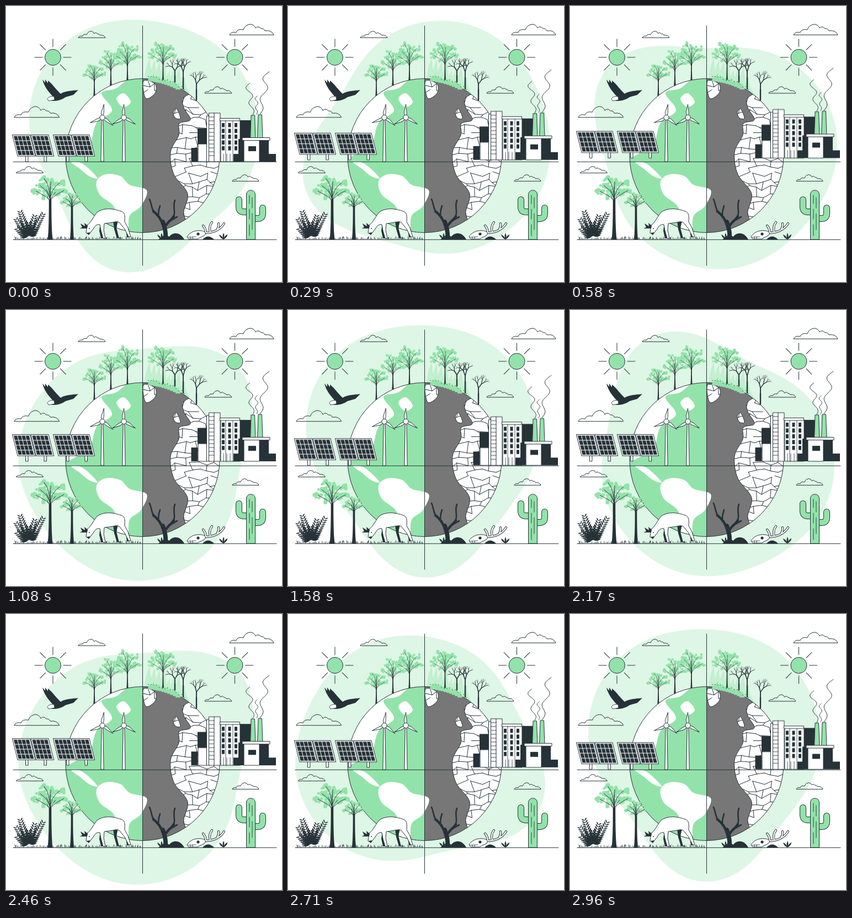
An HTML page that plays this animation: 500 px wide and 500 px high, repeating every 3 s.

```html
<!DOCTYPE html>
<html lang="en">
<head>
<meta charset="utf-8">
<title>Two halves of a planet</title>
<style>
  html, body { margin: 0; width: 100%; height: 100%; overflow: hidden; background: #fff; }
  svg { display: block; width: 100vw; height: 100vh; }
  .line { fill: none; stroke: #263238; stroke-linecap: round; stroke-linejoin: round; }
  .box { fill: #fff; stroke: #263238; stroke-linejoin: round; }
  .white { fill: #fff; }
  .gray { fill: #777; }
  .dark { fill: #263238; }
  .green { fill: #92e3a9; }
  .pale { fill: #c1efcf; }
  .lit { fill: #92e3a9; stroke: #263238; stroke-linejoin: round; }
  #blob { fill: #def6e5; transform-origin: 248px 255px; animation: spin 3s linear infinite; }
  .float { animation: float 3s linear infinite; }
  /* Two turns and two bobs per loop; the pace picks up at 36% */
  @keyframes spin {
    36% { transform: rotate(217.8deg); }
    100% { transform: rotate(720deg); }
  }
  @keyframes float {
    0%, 54.12%, 100% { transform: translateY(0); }
    29.75%, 77.06% { transform: translateY(-10px); }
    36% { transform: translateY(-7.9px); }
  }
</style>
</head>
<body>
<svg viewBox="0 0 500 500">
  <defs>
    <clipPath id="globe"><circle cx="247.5" cy="271" r="139.5"/></clipPath>
    <clipPath id="north"><rect x="107" y="131" width="140.5" height="151"/></clipPath>
    <clipPath id="soil"></clipPath>
    <path id="cloud" class="line" vector-effect="non-scaling-stroke"
      d="M0 20Q3 14 12 16Q14 9 25 11Q28 2 38 1Q45 2 47 8Q52 3 57 9Q62 8 64 13Q76 11 80 20Z"/>
  </defs>

  <path id="blob"/>
  <g id="sky"></g>
  <g id="hill"></g>
  <g id="earth" clip-path="url(#globe)"></g>
  <circle cx="247.5" cy="271" r="139.5" class="line"/>
  <g id="sparks"></g>
  <path class="line" d="M247.5 36V470M13 282.3H490M13 423.3H490"/>
  <g id="turbines"></g>
  <g id="panels" class="float"></g>
  <g id="factory" class="float"></g>
  <g id="garden"></g>

  <g id="bird">
    <path class="dark" d="M84 163C77 155 69 146 66 133L71 139 71 133 76 140 76 135C85 142 90 151 99 159C108 153 120 154 131 152L122 161 108 165C98 172 88 173 80 171Z"/>
    <path class="box" stroke-width=".8" d="M87 164C81 163 77 165 75 168L77 172 88 170Z"/>
  </g>

  <g id="deer">
    <path class="dark" d="M194 389H203L200 402 205 421H201L196 404ZM207 388L223 405 222 419H219L217 405ZM171 393H177L174 407 176 421H172L169 407Z"/>
    <path class="box" d="M147 397C155 392 158 381 166 373C179 364 198 368 209 372C217 375 215 383 215 391L221 402 226 418H222L215 404 206 393C202 388 194 393 178 394L177 406 180 421H176L172 407 170 396C165 395 161 398 158 404L150 414 145 411Z"/>
    <path class="dark" d="M148 398L142 393 143 399 135 394 138 401 133 403 147 403ZM146 411L150 415 153 410Z"/>
    <circle class="dark" cx="151" cy="403" r="1"/>
  </g>

  <g id="desert">
    <path class="dark" d="M292 423C300 408 315 408 323 423ZM356 423Q366 412 377 423ZM276 423L289 413 302 423Z"/>
    <path class="line" stroke-width="8" d="M289 419C290 410 288 402 284 391"/>
    <path class="line" stroke-width="4.5" d="M285 398C281 386 274 377 267 372M287 402C295 387 300 389 304 381"/>
    <path class="line" stroke-width="2.6" d="M268 373C263 366 264 358 260 350M276 379Q276 370 279 362M302 383C309 374 301 365 306 352M296 390L310 382"/>
    <g id="antlers"></g>
    <path class="box" d="M328 418C332 411 341 406 352 407C359 407 364 411 360 415C356 419 351 418 348 422H331Z"/>
    <circle class="dark" cx="348" cy="413" r="2.6"/>
    <path class="line" stroke-width=".8" d="M330 419L344 418M334 418V422M338 418V422"/>
    <g id="sprouts"></g>
    <g id="cactus"></g>
  </g>
</svg>

<script>
const $ = id => document.getElementById(id);
const add = (id, html) => $(id).insertAdjacentHTML('beforeend', html);

let seed = 7;
const rnd = (a = 0, b = 1) => {
  seed = (seed * 16807) % 2147483647;
  return a + (b - a) * seed / 2147483647;
};
const range = n => [...Array(n).keys()];
const rect = (x, y, w, h, cls) => `<rect x="${x}" y="${y}" width="${w}" height="${h}" class="${cls}"/>`;
const line = (d, w = 1) => `<path class="line" stroke-width="${w}" d="${d}"/>`;
const shape = (d, cls) => `<path class="${cls}" d="${d}"/>`;
const disc = (x, y, r) => `M${x - r} ${y}a${r} ${r} 0 1 0 ${2 * r} 0a${r} ${r} 0 1 0 ${-2 * r} 0`;

// A tube: dark rim with a lighter core
const tube = (d, w, core) => line(d, w) +
  `<path d="${d}" fill="none" stroke="${core}" stroke-width="${w - 2}" stroke-linecap="round"/>`;

// Closed curve through a few "x,y" points
function smooth(text) {
  const p = text.split(' ').map(q => q.split(',').map(Number));
  const n = p.length, at = i => p[(i + n) % n];
  const lean = (a, b, c) => [a[0] + (c[0] - b[0]) / 6, a[1] + (c[1] - b[1]) / 6];
  return 'M' + p[0] + p.map((b, i) =>
    `C${lean(b, at(i - 1), at(i + 1))} ${lean(at(i + 1), at(i + 2), b)} ${at(i + 1)}`).join('') + 'Z';
}

// Backdrop: a rounded, uneven triangle built from a few waves
$('blob').setAttribute('d', 'M' + range(180).map(i => {
  const t = i * Math.PI / 90;
  const r = 212 - 16 * Math.sin(t) - 12 * Math.cos(2 * t) + 14 * Math.cos(3 * t + 1.03)
    + 5.5 * Math.cos(4 * t - .95) + 3 * Math.cos(5 * t - 2.53);
  return [248 + r * Math.cos(t), 255 + r * Math.sin(t)];
}).join('L') + 'Z');

// Sky
for (const [x, y, k] of [[131, 45, .61], [405, 32, 1], [360, 145.5, .61], [15, 181, 1.02], [18.5, 290, .61], [410, 305, .6]])
  add('sky', `<use href="#cloud" transform="translate(${x} ${y}) scale(${k})"/>`);
for (const x of [85, 414.5]) {
  const rays = range(8).map(i => `<path class="line" transform="rotate(${i * 45})" d="M19 0H33"/>`);
  add('sky', `<g transform="translate(${x} 93)"><circle class="lit" r="14.5"/>${rays.join('')}</g>`);
}

// Earth: one water colour per quadrant, land on top
add('earth', rect(107, 131, 141, 151, 'white') + rect(107, 282, 141, 130, 'green') + rect(247.5, 131, 141, 281, 'gray'));
add('earth', `<g clip-path="url(#north)">
  ${shape(smooth('173,158 200,149 226,130 262,125 262,300 112,286 128,265 152,249 164,212 192,189'), 'green')}
  ${shape(smooth('200,168 213,158 226,174 212,183'), 'white')}</g>`);
add('earth', shape(
  smooth('118,283 132,283 147,292 166,312 150,308 134,295') +
  smooth('164,318 180,305 207,308 224,324 255,334 244,363 224,380 220,412 203,410 197,366 170,342'), 'white'));

const soil = [
  '322,166 350,160 400,200 400,330 342,392 322,377 329,340 304,305 298,265 313,234 314,213 334,206 322,184',
  '303,193 309,186 316,203 307,203',
  '249,136 270,141 270,158 253,167'
].map(smooth).join('');
$('soil').innerHTML = `<path d="${soil}"/>`;
add('earth', shape(soil, 'box'));

// Cracked soil: a jittered honeycomb with a few joints left out
{
  const node = range(13 * 22).map(i => [244 + i % 13 * 13 + rnd(-5, 5), 130 + Math.floor(i / 13) * 12.5 + rnd(-5, 5)]);
  let d = '';
  for (let i = 0; i < 13 * 21; i++) {
    const c = i % 13, r = (i - c) / 13;
    if (c < 12 && rnd() < .85) d += `M${node[i]}L${node[i + 1]}`;
    if ((r + c) % 2 && rnd() < .9) d += `M${node[i]}L${node[i + 13]}`;
  }
  add('earth', `<g clip-path="url(#soil)">${line(d)}</g>`);
}

// Leafy tree: twigs fan out from the trunk to clumps spread on a spiral
function tree(id, x, base, cy, w, h, trunk) {
  let twigs = '', leaves = '';
  const fork = cy + h * .55;
  for (const i of range(10)) {
    const a = i * 2.4, r = .42 * Math.sqrt(i / 9);
    const px = x + Math.cos(a) * r * w, py = cy + Math.sin(a) * r * h;
    twigs += `M${x} ${fork}Q${x} ${py + h * .25} ${px} ${py}`;
    for (const j of range(9))
      leaves += disc(px + rnd(-.12, .12) * w, py + rnd(-.1, .1) * h, rnd(.03, .06) * w);
  }
  const t = trunk, top = t * .45;
  add(id, shape(leaves, 'green') + line(twigs, .4 + t * .1) +
    shape(`M${x - t} ${base}Q${x - top} ${base - 8} ${x - top} ${fork - 4}H${x + top}Q${x + top} ${base - 8} ${x + t} ${base}Z`, 'dark'));
}

function bareTree(x, base, height) {
  const levels = ['', '', '', '', ''];
  const grow = (x, y, a, len, depth) => {
    const nx = x + Math.cos(a) * len, ny = y + Math.sin(a) * len;
    levels[depth] += `M${x} ${y}L${nx} ${ny}`;
    if (depth) for (const s of [-1, 1]) grow(nx, ny, a + s * rnd(.2, .65), len * rnd(.65, .85), depth - 1);
  };
  grow(x, base - height * .3, -Math.PI / 2, height * .23, 4);
  add('hill', line(`M${x} ${base}V${base - height * .35}`, 2.4) + levels.map((d, i) => line(d, .5 + i * .35)).join(''));
}

// Flames grow tallest in the middle of the row
const flames = (x0, x1, step, top, foot) => {
  let d = '';
  for (let x = x0; x < x1; x += step) {
    const y = foot(x), h = top * rnd(.55, 1);
    d += `M${x - step} ${y + 4}Q${x - step} ${y - h * .4} ${x + 1} ${y - h}Q${x} ${y - h * .4} ${x + step} ${y + 4}Z`;
  }
  return d;
};
const rim = x => 271 - Math.sqrt(139.5 ** 2 - (x - 247.5) ** 2);
add('hill', shape(flames(260, 330, 9, 42, rim), 'pale'));
tree('hill', 160, 164, 119, 40, 32, 1.8);
tree('hill', 190, 144, 97, 42, 38, 1.8);
tree('hill', 220, 136, 84, 51, 44, 1.8);
tree('hill', 284.5, 137, 83, 51, 42, 1.8);
bareTree(306, 144, 50);
bareTree(321, 150, 58);
bareTree(345, 170, 54);
add('sparks', shape(flames(262, 315, 5, 10, rim), 'green') +
  line(range(14).map(i => `M${258 + i * 5} ${rim(258 + i * 5) - rnd(1, 7)}h.1`).join(''), 1.3));

// Wind turbines
for (const [x, turn] of [[174.5, 7], [213.5, 0]]) {
  const blades = [0, 120, 240].map(a =>
    `<path class="box" stroke-width=".9" transform="rotate(${a + turn})" d="M-1.3 -2L-3.2 -9 0 -24 1.6 -9 1.3 -2Z"/>`);
  add('turbines', `<g transform="translate(${x} 202)"><path class="box" d="M-1.3 0L-2.6 80H2.6L1.3 0Z"/>
    ${blades.join('')}<circle class="box" r="4.6"/></g>`);
}

// Solar panels
for (const left of [11.5, 85.5])
  for (const x of [left, left + 33.5]) {
    const cells = range(16).map(i => rect(2 + i % 4 * 7.2, 2 + (i >> 2) * 8.9, 6.2, 7.9, 'dark'));
    add('panels', rect(x + 24, 270, 4.5, 12, 'box') +
      `<g transform="translate(${x} 233.5) skewX(14)">${rect(0, 0, 32, 38.5, 'box')}${cells.join('')}</g>`);
  }

// Factory
const smoke = (x, y, height, drift, sway) => line('M' + range(40).map(i => {
  const k = i / 39;
  return [x + drift * k + sway * Math.sin(k * 13) * (.5 + k / 2), y - height * k];
}).join('L'));
const chimney = (x, y) => shape(`M${x} ${y}h6.5l1.5 45h-9.5Z`, 'lit');
add('factory',
  rect(335.5, 257, 12, 25, 'dark') + rect(347, 221.5, 17, 30, 'dark') + rect(348, 250, 16, 32, 'box') +
  rect(424, 207, 20, 36, 'dark') +
  rect(363.5, 199, 5, 83, 'box') + rect(367.5, 194, 20.5, 88, 'box') + line('M377 194V282') +
  range(11).map(i => line(`M367.5 ${201 + i * 7}H377`, .9)).join('') +
  rect(389, 207, 35, 75, 'box') + rect(387.5, 203.5, 36, 4.5, 'box') + line('M398 208V282M411 208V282', .8) +
  range(15).map(i => rect(391 + i % 3 * 11.5, 212 + Math.floor(i / 3) * 10.5, 5, 7.5, 'dark')).join('') +
  range(3).map(i => line(`M${394 + i * 6} 268V282`, .8)).join('') +
  chimney(444, 198) + chimney(457, 197) +
  rect(412, 268, 20, 14, 'dark') + rect(421, 241, 12, 28, 'dark') +
  rect(459, 243, 17, 39, 'dark') + rect(472, 268, 17, 14, 'dark') +
  rect(431, 243, 28, 39, 'box') + rect(428, 238.5, 50, 5, 'box') + rect(439, 254, 14, 9, 'dark') +
  smoke(447, 197, 57, -8, 6) + smoke(454, 196, 33, 0, 3) + smoke(460, 196, 77, 14, 7));

// Garden
tree('garden', 80, 423, 328, 66, 48, 5);
tree('garden', 119.5, 423, 350, 42, 30, 4);

// Pointed leaf
const leaf = (x, y, a, len, fat) => {
  const c = Math.cos(a) * len, s = Math.sin(a) * len;
  const side = k => `${x + c / 2 - s * k} ${y + s / 2 + c * k}`;
  return `M${x} ${y}Q${side(fat)} ${x + c} ${y + s}Q${side(-fat)} ${x} ${y}`;
};
let fern = '';
for (const i of range(6)) {
  const a = -2.45 + i * .28, len = 30 + i % 3 * 11;
  for (let s = 4; s <= len; s += 4.5)
    for (const side of [-.8, .8])
      fern += leaf(42 + Math.cos(a) * s, 421 + Math.sin(a) * s, a + side, 13 * (1 - .5 * s / len), .3);
}
let grass = '';
for (let x = 14; x < 246; x += 2.3) grass += leaf(x, 424, rnd(-2, -1.1), rnd(3, 8), .18);
add('garden', shape(fern + grass, 'dark'));

// Desert
add('antlers', tube('M356 411Q384 412 395 394M370 410Q367 399 373 392M382 406Q386 400 385 394M362 410Q361 402 357 398', 4.2, '#fff'));
for (const x of [282, 394])
  add('sprouts', shape([-2.3, -1.57, -.9].map(a => leaf(x, 423, a, 12, .25)).join(''), 'dark'));
add('cactus',
  tube('M443.5 385H456Q465 385 465 376V366M443.5 373H431Q422 373 422 364V351', 12, '#92e3a9') +
  shape('M435.5 423V342C435.5 331 451.5 331 451.5 342V423Z', 'lit') +
  line('M441 343V358M446 347V366M441 368V386M446 376V405M441 396V416', .9));
</script>
</body>
</html>
```
